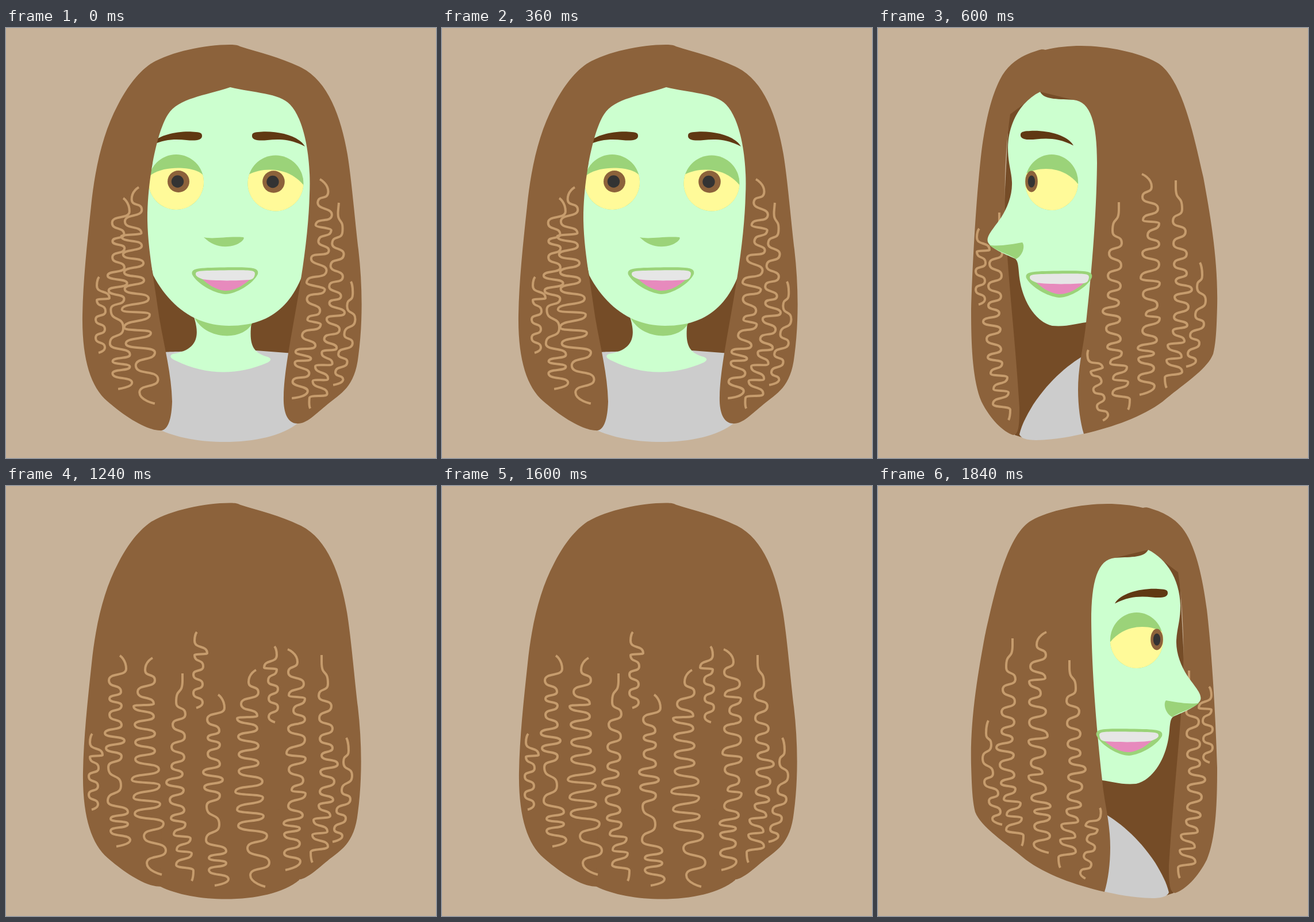
Write an HTML page that moves like this. It is 748 px wide and 748 px high and loops after 2.44 s.

```html
<!DOCTYPE html>
<html lang="en">
<head>
<meta charset="utf-8">
<title>Turning head</title>
<style>
html, body { margin: 0; height: 100%; overflow: hidden; background: #c7b299 }
svg { display: block; width: 100%; height: 100% }
.hair { fill: #8c623b }
.back { fill: #754c27 }
.skin { fill: #ccffcf }
.shade { fill: #9bd379 }
.shirt { fill: #ccc }
.brow { fill: #603813 }
.eye { fill: #fffa99 }
.pupil { fill: #333 }
.strand { fill: none; stroke: #c69c6d; stroke-width: 4 }
</style>
</head>
<body>
<svg viewBox="0 0 748 748">
<defs>
  <g id="strands" class="strand"></g>

  <path id="brow" class="brow" d="M428 187C428 181 436 181 445 180.5C475 179 510 188 520 206C495 193 475 193 455 195C444 196 427 197 428 187Z"/>

  <g id="eye">
    <circle class="shade" cx="469" cy="270" r="48.5"/>
    <path class="eye" d="M423 254.6C445 243 490 240 517.4 273A48.5 48.5 0 1 1 423 254.6Z"/>
  </g>

  <g id="mouth">
    <path class="shade" d="M324 429C321 418 333 417 380 416.5C425 416 441 416 438 428C430 445 400 463 381 463C360 461 333 445 324 429Z"/>
    <path fill="#e78abd" d="M340 435C355 438 400 438 426 436C408 452 395 457 380 457C365 455 350 446 340 435Z"/>
    <path fill="#e6e6e6" d="M330 428C330 422 337 422 380 421.5C428 421 433 421 433 428C432 434 430 437 424 438C400 440 358 440 342 437C335 434 330 432 330 428Z"/>
  </g>

  <path id="torso" d="M270 564C290 563 320 562 435 561L500 566 508 687C460 728 330 730 266 698Z"/>

  <g id="front">
    <path class="back" d="M245 400H525V580H265Z"/>
    <use href="#torso" class="shirt"/>
    <path class="skin" d="M326 500C338 535 334 560 290 567C283 570 286 575 296 579C345 603 400 606 455 582C463 578 461 574 455 572C430 565 422 552 427 512Z"/>
    <path class="shade" d="M326 500C345 545 415 545 429 512Z"/>
    <path class="skin" d="M256 430C285 485 330 518 388 518C450 518 490 492 514 434L540 300 530 90H240L235 330Z"/>
    <use href="#brow"/>
    <use href="#brow" transform="matrix(-1 0 0 1 769 0)"/>
    <use href="#eye"/>
    <circle class="shade" cx="296" cy="268" r="48"/>
    <path class="eye" d="M249 258.3C270 238 330 240 342.4 255.7A48 48 0 1 1 249 258.3Z"/>
    <circle class="hair" cx="300" cy="267" r="19"/>
    <circle class="pupil" cx="298.5" cy="267" r="10.7"/>
    <circle class="hair" cx="465.5" cy="267.5" r="19.3"/>
    <circle class="pupil" cx="464" cy="267.5" r="10.7"/>
    <path class="shade" d="M344 364C360 368 385 362 413 364C416 366 410 373 400 377C380 384 360 380 344 364Z"/>
    <use href="#mouth"/>
    <path class="hair" d="M389 29C395 29 402 29 407 32C442 43 480 52 514 69C560 92 583 155 594 220C601 262 608 345 613 385C620 445 621 510 613 570C607 625 582 636 560 654C537 673 522 689 507 688C488 688 482 665 483 640C484 590 500 520 513 437C522 380 527 330 528 290C531 230 520 160 494 133C476 113 430 113 390 103C345 118 300 122 282 150C262 180 245 270 246 335C247 385 256 430 266 500C274 550 288 600 289 650C288 680 282 702 267 700C240 699 200 670 176 649C147 624 132 575 133 500C134 440 141 375 148 310C155 240 170 180 194 135C208 108 226 80 252 62C285 42 345 29 389 29Z"/>
    <g class="strand">
      <use href="#D" transform="translate(162 433)"/>
      <use href="#F" transform="translate(204 296) rotate(.5)"/>
      <use href="#E" transform="translate(231 277) rotate(-1.8)"/>
      <use href="#B" transform="translate(546 263) rotate(6.7)"/>
      <use href="#A" transform="translate(579 304) rotate(5.4)"/>
      <use href="#C" transform="translate(600 441) rotate(2.2)"/>
    </g>
  </g>

  <g id="side">
    <path class="back" d="M230 100H370V600L250 712 238 708 215 400Z"/>
    <path class="shirt" d="M365 566C335 582 300 610 270 655C258 675 250 690 246 707C249 715 262 717 275 717C310 716 335 711 365 704Z"/>
    <path class="hair" d="M291 38C312 33 332 31 353 31C400 31 455 43 485 60C530 85 552 200 566 260C578 325 592 405 590 485C589 520 588 548 583 567C572 595 530 620 495 650C460 676 410 694 358 706C350 680 346 640 349 605C352 570 359 545 362 512L340 125 282 111 230 150C220 220 218 300 224 380C228 450 240 560 246 660C246 690 245 708 235 708C218 703 195 680 180 650C163 610 162 540 162 490C164 420 170 300 180 215C188 155 198 118 212 90C228 58 255 46 278 39C283 37 288 37 291 38Z"/>
    <g class="strand">
      <use href="#D" transform="translate(176 349)"/>
      <use href="#A" transform="translate(211 321) scale(-1 1)"/>
      <use href="#D" transform="translate(366 560) rotate(-12) scale(1 .95)"/>
      <use href="#A" transform="translate(419 303) scale(-1 1)"/>
      <use href="#B" transform="translate(459 254)"/>
      <use href="#A" transform="translate(518 265)"/>
      <use href="#C" transform="translate(560 408)"/>
    </g>
    <path class="skin" d="M282 111C289 126 318 123 340 125C370 128 381 165 381 235C380 330 371 430 362 512C345 514 330 520 303 518C275 512 249 475 245 425C244 412 243 404 238 401C220 393 195 383 191 372C188 362 200 350 214 330C225 313 234 290 233 268C232 248 226 235 226 208C227 165 248 128 282 111Z"/>
    <path class="shade" d="M193 377C205 381 235 376 251 373C256 378 253 395 240 402C230 394 205 388 193 377Z"/>
    <use href="#brow" transform="translate(-180 -1.5)"/>
    <use href="#eye" transform="translate(-143.5 -1.5) scale(.95 1)"/>
    <ellipse class="hair" cx="267" cy="267" rx="10.8" ry="18.5"/>
    <ellipse class="pupil" cx="267" cy="267" rx="6.2" ry="10.5"/>
    <use href="#mouth" transform="translate(-66 6)"/>
  </g>

  <g id="rear">
    <path class="hair" transform="translate(1.5 .6) scale(.996)" d="M389 29C395 29 402 29 407 32C442 43 480 52 514 69C560 92 583 155 594 220C601 262 608 345 613 385C620 445 621 510 613 570C607 625 582 636 560 654C537 673 522 687 507 687L267 699C240 699 200 670 176 649C147 624 132 575 133 500C134 440 141 375 148 310C155 240 170 180 194 135C208 108 226 80 252 62C285 42 345 29 389 29Z"/>
    <use href="#torso" class="hair" transform="translate(2 -1.5)"/>
    <g class="strand">
      <use href="#D" transform="translate(150 431)"/>
      <use href="#F" transform="translate(198 295)"/>
      <use href="#E" transform="translate(255 299)"/>
      <use href="#A" transform="translate(307 326) scale(-1 1)"/>
      <use href="#D" transform="translate(332 254)"/>
      <use href="#F" transform="translate(369 363)"/>
      <use href="#E" transform="translate(435 320)"/>
      <use href="#D" transform="translate(467 279) scale(-1 1)"/>
      <use href="#B" transform="translate(490 284)"/>
      <use href="#A" transform="translate(549 294)"/>
      <use href="#C" transform="translate(592 438)"/>
    </g>
  </g>
</defs>
<use id="view" href="#front"/>
</svg>
<script>
// Turning points of each wavy strand, relative to its top end
const strands = {
  A: '0 0,0 12,11 50,-5 71,17 89,-4 110,19 128,-3 146,19 162,0 175,28 190,-2 203,22 220,-3 238,20 252,-5 262,15 280,-14 287,10 307,-16 313,11 333,-19 343,-16 361',
  B: '0 0,17 22,1 40,28 60,2 80,30 86,10 107,30 122,1 138,30 157,-2 181,31 190,2 209,27 228,7 245,31 251,1 273,26 289,-7 303,21 312,-6 322,21 338,-6 355,22 369,-4 384',
  C: '0 0,4 22,-5 42,10 66,-8 92,7 107,-17 127,-1 140,-21 159,-7 171,-24 181',
  D: '0 0,-4 15,18 37,-4 40,11 60,-6 74,10 91,-6 106,10 123,-1 132',
  E: '0 0,-13 21,4 39,-26 59,2 80,-33 84,2 102,-31 116,4 132,-30 147,4 162,-30 176,11 194,-36 212,12 222,-33 243,13 254,-31 271,19 288,-15 310,23 335,-10 357,16 377',
  F: '0 0,11 23,-19 43,2 63,-18 75,3 87,-18 103,3 121,-26 135,8 148,-24 161,3 175,-20 194,2 226,-21 253,14 272,-16 284,14 293,-16 305,18 321,-6 332'
};

// Vertical tangent at every turn, free tangents at both ends
function wave(text) {
  const points = text.split(',').map(p => p.split(' ').map(Number));
  return points.slice(1).reduce((d, [x, y], i) => {
    const [px, py] = points[i], k = (y - py) * 0.7;
    const k1 = i ? k : 0, k2 = i < points.length - 2 ? k : 0;
    return `${d}C${px} ${py + k1} ${x} ${y - k2} ${x} ${y}`;
  }, 'M0 0');
}

const holder = document.getElementById('strands');
for (const id in strands) {
  const path = document.createElementNS('http://www.w3.org/2000/svg', 'path');
  path.id = id;
  path.setAttribute('d', wave(strands[id]));
  holder.append(path);
}

const mirror = 'matrix(-1 0 0 1 752 0)';
const poses = [[600, '#front', ''], [1240, '#side', ''], [1840, '#rear', ''], [2440, '#side', mirror]];
const view = document.getElementById('view');
let shown;

function draw(now) {
  const pose = poses.find(p => now % 2440 < p[0]);
  if (pose !== shown) {
    shown = pose;
    view.setAttribute('href', pose[1]);
    view.setAttribute('transform', pose[2]);
  }
  requestAnimationFrame(draw);
}
draw(performance.now());
</script>
</body>
</html>
```
